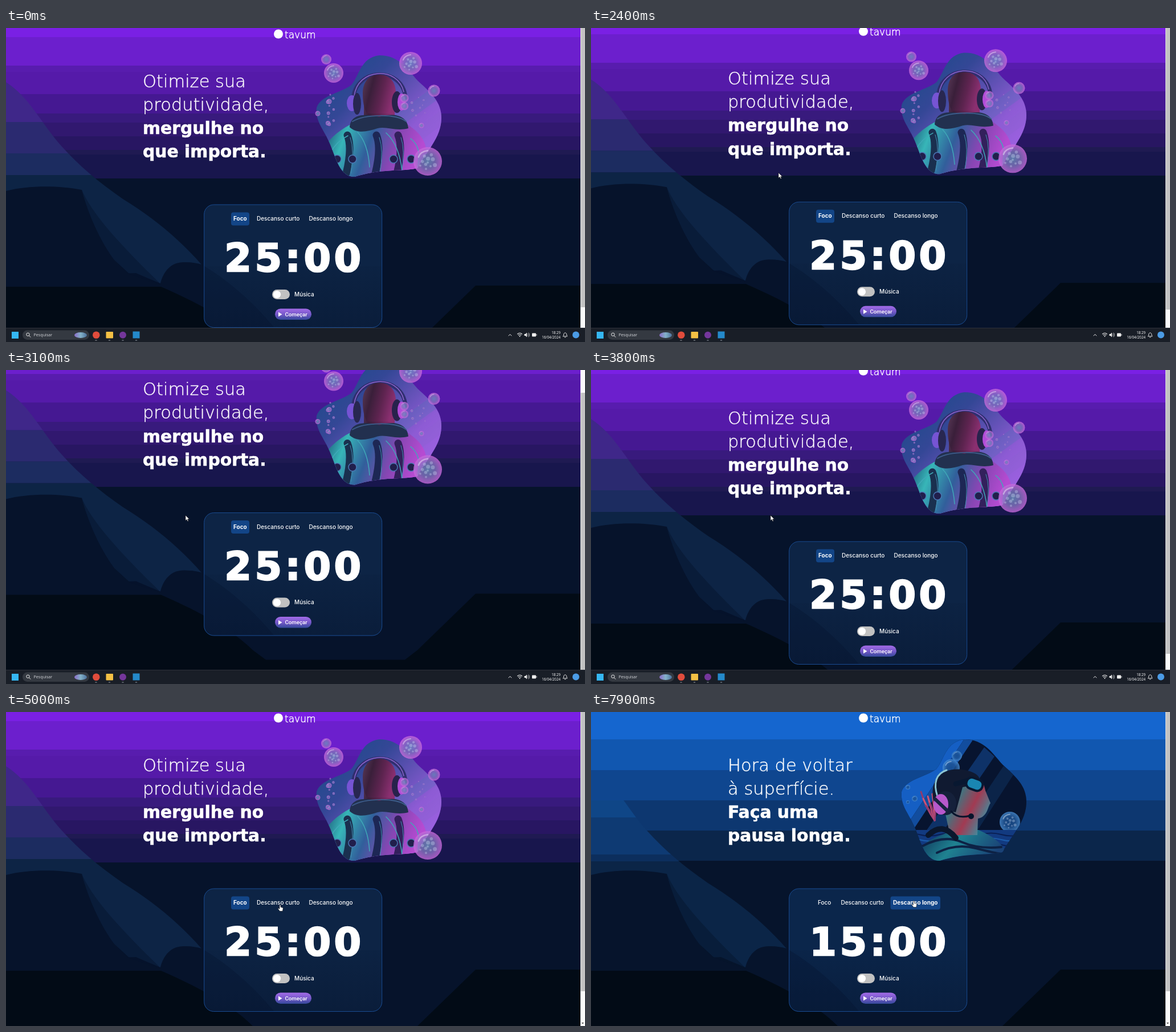
An HTML page for the animation above (8 s loop, 1016 px wide and 551 px high).

```html
<!DOCTYPE html>
<html lang="pt">
<head>
<meta charset="utf-8">
<title>Cronômetro</title>
<style>
html, body { margin: 0; width: 100%; height: 100%; overflow: hidden; background: #06122b; }
svg { display: block; width: 1016px; height: 551px; }
.head { font-family: "DejaVu Sans", sans-serif; fill: #fff; stroke: #fff; }
.thin { font-size: 30.5px; font-weight: 200; stroke-width: .4px; }
.bold { font-size: 29.8px; font-weight: 700; stroke-width: .6px; }
.name { font-size: 17px; font-weight: 200; stroke-width: .5px; }
.clock { font-size: 68.5px; font-weight: 700; letter-spacing: 5.5px; stroke-width: 2.4px; text-anchor: middle; }
.ui { font: 500 10px Inter, sans-serif; fill: #fff; }
.ui .on { font-weight: 700; }
.start { font: 500 9.7px Roboto, sans-serif; fill: #fff; }
.bar { font: 7.2px "Open Sans", sans-serif; fill: #d4d6da; }
.now { font-size: 6.2px; text-anchor: end; fill: #fff; }
</style>
</head>
<body>
<svg id="stage" viewBox="0 0 1016 551"></svg>
<script>
const LOOP = 8000, PAGE = 611;

const RIDGE = "M0 95C42 122 62 168 98 208C130 244 165 272 205 300C262 335 306 373 343 415C318 408 290 408 275 450L228 430L0 440Z";
const HILL = "M0 286C38 276 92 276 133 284C139 308 158 364 190 407L215 430L275 454H0Z";
const SLOPE = "M133 284C150 325 200 380 272 450L215 432L190 407C158 364 139 308 133 284Z";
const MOUND = "M270 452C276 424 292 410 314 411C328 411 336 414 348 417L390 452L435 552H330Z";
const DEEP = "M0 454H272C322 476 390 508 433 551L456 568H700L722 551L824 452H1008V611H0Z";
const BLOB = "M655 48C690 48 704 72 722 92C748 116 764 130 764 158C764 192 738 216 722 246C700 252 660 246 612 261C584 262 578 222 566 198C556 176 543 164 545 140C552 118 588 114 606 100C620 84 622 52 655 48Z";
const BLOB_B = "M632 54C652 44 672 58 686 78C712 94 754 92 765 132C770 180 746 246 706 262C664 270 610 256 582 226C564 196 538 162 552 130C562 108 584 92 600 82C612 92 626 82 640 80Z";

const themes = [
  {
    bands: [[0, "#7a20e4"], [16, "#6c1fcd"], [66, "#581cae"], [77, "#551aa9"], [116, "#451892"], [150, "#381a7d"], [166, "#31186f"], [190, "#281662"], [214, "#1f1a52"], [222, "#18164d"], [264, "#06132b"]],
    ridge: [[95, "#3f2789"], [165, "#2b2a70"], [220, "#1c2c60"], [258, "#0d2445"]],
    lines: ["Otimize sua", "produtividade,", "mergulhe no", "que importa."],
    clock: "25:00", tabs: [399, 440, 531.5], pill: [395, 32], card: "#0d2445"
  },
  {
    bands: [[0, "#106957"], [42, "#0c5350"], [150, "#0b2e49"], [187, "#07303f"], [222, "#052937"], [259, "#06142e"]],
    ridge: [[150, "#0c5350"], [214, "#0c304a"], [262, "#0c2b48"]],
    lines: ["Que tal dar", "uma respirada?", "Faça uma", "pausa curta!"],
    clock: "05:00", tabs: [398, 438.5, 532], pill: [434, 85], card: "#0c2c47"
  },
  {
    bands: [[0, "#1566cf"], [48, "#1157b0"], [102, "#0f468f"], [155, "#0d3770"], [208, "#0b264b"], [261, "#06142c"]],
    ridge: [[155, "#0f4687"], [185, "#0e3a73"], [250, "#0c2e5d"], [262, "#0b2547"]],
    lines: ["Hora de voltar", "à superfície.", "Faça uma", "pausa longa."],
    clock: "15:00", tabs: [398, 438.5, 530], pill: [525.5, 87.5], card: "#0b264b"
  }
];

const circle = (x, y, r, a) => `<circle cx="${x}" cy="${y}" r="${r}" ${a}/>`;
const oval = (x, y, rx, ry, a) => `<ellipse cx="${x}" cy="${y}" rx="${rx}" ry="${ry}" ${a}/>`;
const rect = (x, y, w, h, a) => `<rect x="${x}" y="${y}" width="${w}" height="${h}" ${a}/>`;
const shape = (d, a) => `<path d="${d}" ${a}/>`;
const line = (d, color, w) => shape(d, `fill="none" stroke="${color}" stroke-width="${w}" stroke-linecap="round" stroke-linejoin="round"`);
const text = (x, y, s, cls) => `<text x="${x}" y="${y}" class="${cls}">${s}</text>`;
const stops = colors => colors.map((c, i) => `<stop offset="${i / (colors.length - 1)}" stop-color="${c}"/>`).join("");
const linear = (id, x2, y2, ...colors) => `<linearGradient id="${id}" x2="${x2}" y2="${y2}">${stops(colors)}</linearGradient>`;
const radial = (id, ...colors) => `<radialGradient id="${id}">${stops(colors)}</radialGradient>`;
const bands = list => list.map(([y, c], i) => rect(0, y, 1008, (list[i + 1] || [PAGE])[0] - y, `fill="${c}"`)).join("");

function backdrop(t) {
  const ground = t.bands[t.bands.length - 1][1];
  return `<g shape-rendering="crispEdges">${bands(t.bands)}</g>`
    + `<g clip-path="url(#ridge)">${bands(t.ridge)}</g>`
    + shape(HILL, `fill="${ground}"`) + shape(SLOPE, `fill="${ground}" opacity=".45"`)
    + shape(MOUND, `fill="${ground}"`) + shape(DEEP, 'fill="#020b16"');
}

function card(t, n) {
  const names = ["Foco", "Descanso curto", "Descanso longo"];
  const labels = names.map((s, i) => text(t.tabs[i], 338, s, i === n ? "on" : "")).join("");
  return rect(347.7, 310, 312, 215.5, `rx="17" fill="${t.card}"`)
    + shape("M348 418H659V508C659 520 650 525 642 525H365C354 525 348 516 348 508Z", 'fill="url(#shade)"')
    + shape("M348 418C392 444 436 484 470 525H365C354 525 348 516 348 508Z", 'fill="#06132b" opacity=".3"')
    + rect(347.7, 310, 312, 215.5, 'rx="17" fill="none" stroke="#194b91"')
    + rect(t.pill[0], 323.5, t.pill[1], 23, 'rx="4" fill="#134587"')
    + `<g class="ui">${labels}${text(506, 470.7, "Música", "")}</g>`
    + text(506, 427.3, t.clock, "head clock")
    + rect(467, 459, 31, 17, 'rx="8.5" fill="#c1c1c1"') + circle(475.5, 467.5, 6.6, 'fill="#fff"')
    + rect(472, 492.5, 64, 19.5, 'rx="9.7" fill="url(#button)"')
    + shape("M478 498.5L484.5 502.5L478 506.5Z", 'fill="#fff"')
    + text(489.5, 505.7, "Começar", "start");
}

const scene = (t, n) => backdrop(t)
  + circle(478, 10.5, 8, 'fill="#fff"') + text(489, 17.5, "tavum", "head name")
  + t.lines.map((s, i) => text(240, 103.5 + i * 41.3, s, "head " + (i < 2 ? "thin" : "bold"))).join("")
  + card(t, n);

function bubble(x, y, r, tone) {
  let s = circle(x, y, r, `fill="url(#${tone})" fill-opacity=".8"`);
  if (r > 15) {
    for (let i = 0; i < 11; i++) {
      const a = i * 2.4, d = r * 0.19 * Math.sqrt(i);
      s += circle(x + d * Math.cos(a), y + d * Math.sin(a) + 2, r * (0.08 + i % 3 * 0.03), 'fill="#dfeaff" fill-opacity=".3"');
    }
  }
  return s + line(`M${x - r * .65} ${y - r * .3}Q${x - r * .5} ${y - r * .7} ${x} ${y - r * .75}`, "#ffffff66", r * .1);
}

function bubbles(tone) {
  const big = [[562, 55, 9], [575, 79, 17], [710, 62, 20], [751, 110, 10.5], [740, 234, 25], [699, 123, 7.5], [699, 137, 7], [547, 150, 4.5], [729, 171, 4.5], [567, 129, 4.5], [565, 167, 4]];
  let s = big.map(b => bubble(...b, tone)).join("");
  for (let i = 0; i < 9; i++) s += bubble(569 + 6 * Math.sin(i * 2), 117 + i * 6.5, 1.5 + i % 3 * .7, tone);
  for (let i = 0; i < 8; i++) s += bubble(724 + 12 * Math.sin(i * 2.3), 122 + i * 4.5, 1 + i % 3 * .6, tone);
  return s;
}

const stripes = (list, w) => list.map(([x, c]) => shape(`M${x} 265L${x + 215} 110`, `fill="none" stroke="${c}" stroke-width="${w}"`)).join("");

const diver = `<g clip-path="url(#blob)">${rect(540, 40, 230, 230, 'fill="url(#sky0)"')}`
  + stripes([[545, "#4d74b444"], [615, "#8b61cf55"], [685, "#bd79f466"]], 22)
  + line("M609 128C610 68 696 66 701 122", "#302f70", 7) + line("M611 120C616 70 688 66 698 112", "#8d64cd", 1.5)
  + shape("M556 212C570 190 590 176 611 166H700C717 178 736 190 738 218L722 262H556Z", 'fill="url(#jacket)"')
  + shape("M628 112H682V166H628Z", 'fill="url(#hair)"')
  + shape("M655 82C676 82 684 98 684 114C684 130 681 141 676 150H633C628 140 626 130 626 114C626 98 634 82 655 82Z", 'fill="url(#hair)"')
  + shape("M603 174C605 150 630 150 655 156C682 148 704 154 706 176C684 182 668 172 652 176C634 182 616 186 603 174Z", 'fill="#22304f"')
  + line("M608 164C630 151 684 150 702 164", "#3d5c8a", 2)
  + [[599, "#1a304f"], [650, "#1d2755"], [688, "#33205c"]].map(([x, c]) =>
    line(`M${x} 188Q${x + 9} 210 ${x - 2} 255`, c, 13) + line(`M${x + 5} 192Q${x + 13} 213 ${x + 6} 255`, "#458fb5", 1)).join("")
  + line("M570 218Q580 199 600 189M617 183Q635 202 638 244M667 184Q690 205 695 251M710 194Q731 210 722 246", "#3fa9b8", 1.5)
  + [581, 608, 680, 711].map(x => circle(x, 230, 7, 'fill="#211f4c" stroke="#4a76b4" stroke-width="1.5"')).join("")
  + "</g>" + oval(607, 132, 9, 14, 'fill="#7654d4"') + oval(616, 133, 7, 19, 'fill="#282751"')
  + oval(686, 130, 9, 19, 'fill="#28224c"') + oval(694, 130, 7, 15, 'fill="#b24dd8"') + bubbles("pink");

const runner = `<g clip-path="url(#blobB)">${rect(540, 40, 230, 230, 'fill="#081330"')}`
  + shape("M630 45L772 153V40H650Z", 'fill="#0d5a51"') + shape("M654 75L755 190L770 165V80Z", 'fill="#0c4f4c"')
  + shape("M555 118L600 80L680 155L720 202L690 215Z", 'fill="#101a42"')
  + "</g>"
  + line("M619 135Q608 160 615 186", "#06131d", 11)
  + shape("M612 118C612 92 630 78 650 78C672 78 684 86 688 100L660 152H628C616 144 612 132 612 118Z", 'fill="#071419"')
  + shape("M650 96C664 86 682 92 686 106L691 128C692 146 686 154 668 156L672 177H636L642 140Z", 'fill="url(#skin)"')
  + line("M627 126C614 91 631 78 656 80", "#0a282a", 6) + line("M621 122C614 92 629 78 653 78", "#38aa63", 1.3)
  + oval(631, 135, 14, 17, 'fill="#081b1e"') + oval(626, 135, 9, 13, 'fill="none" stroke="#2b4a47" stroke-width="1.5"')
  + shape("M580 232C594 206 618 200 637 164L674 168L677 193C701 199 714 222 706 261C670 270 610 258 580 232Z", 'fill="#0b1329"')
  + shape("M617 204C641 191 660 207 677 194C704 202 711 229 706 260L678 264C690 246 680 226 657 226C638 224 628 212 617 204Z", 'fill="url(#vest)"')
  + line("M639 176Q653 186 674 178M638 184Q652 193 675 187", "#252b57", 3)
  + line("M618 207Q641 221 647 260M596 220Q614 230 620 250M626 199Q657 222 679 264", "#22386f", 1.3)
  + bubbles("mint");

const swimmer = `<g clip-path="url(#blob)">${rect(540, 40, 230, 230, 'fill="#07142f"')}`
  + shape("M540 40H660L540 220Z", 'fill="#155fc4"') + shape("M660 40H676L540 245V220Z", 'fill="#124d9e"')
  + shape("M690 62L708 78L590 250L556 255Z", 'fill="#0e3268"') + shape("M727 90L745 104L680 205H650Z", 'fill="#0b2449"')
  + bubble(632, 98, 15, "azure") + bubble(642, 77, 9, "azure") + bubble(735, 193, 18, "azure")
  + bubble(556, 132, 4, "azure") + bubble(568, 152, 5, "azure") + bubble(556, 158, 3, "azure")
  + rect(540, 207, 230, 60, 'fill="#123a80"')
  + [0, 1, 2, 3, 4].map(i => line(`M540 ${215 + i * 9}q18 -5 36 0t36 0t36 0t36 0t36 0t36 0`, i % 2 ? "#1c5cab" : "#0a1f52", 2)).join("")
  + [0, 1, 2, 3, 4, 5, 6].map(i => line(`M603 190Q${588 + i * 3} 170 ${579 + i * 4} ${140 + i * 3 % 7 * 4}`, i % 2 ? "#ce5374" : "#8e3b70", 3)).join("")
  + shape("M574 252C586 216 616 222 634 205L680 207C710 220 725 234 731 252L610 263Z", 'fill="url(#suit)"')
  + line("M582 235Q620 215 650 228T720 237M607 247Q640 230 675 239T720 249", "#0d2245", 4)
  + "</g>"
  + shape("M641 107C673 103 689 118 692 138L701 160C696 166 696 184 679 187L678 216H630L620 170Z", 'fill="url(#face)"')
  + shape("M604 169C588 117 617 97 651 101C680 105 687 118 679 126L652 132L640 176Z", 'fill="#101a31"')
  + line("M640 126L662 120", "#081831", 9) + `<g transform="rotate(20 674 128)">${rect(658, 117, 29, 20, 'rx="9" fill="#1a86b2" stroke="#081831" stroke-width="4"')}</g>`
  + line("M608 148C600 124 606 108 624 102", "#8cc5d3", 3) + oval(622, 160, 19, 21, 'fill="#15213b"')
  + oval(614, 162, 13, 18, 'fill="#b759cb"') + line("M604 153L625 173", "#18233f", 6)
  + line("M632 174Q643 188 665 182", "#07142c", 3) + circle(667, 183, 5, 'fill="#07142c"')
  + line("M592 216Q617 192 640 221", "#0a172d", 10);

const taskbar = rect(0, 526, 1016, 25, 'fill="#191e27"') + rect(0, 526, 1016, .7, 'fill="#343942"')
  + rect(10, 533, 12, 12, 'fill="#35b6f2"')
  + rect(29, 530.5, 117, 16.5, 'rx="8.2" fill="#343941"')
  + circle(38.5, 537.8, 2.7, 'fill="none" stroke="#eee"') + line("M40.6 540L43 542.4", "#eee", 1)
  + text(48.5, 541.4, "Pesquisar", "bar")
  + oval(131, 539, 11, 5, 'fill="url(#widget)"')
  + circle(158.3, 538.7, 6.3, 'fill="#e04c3c"') + rect(175.5, 533, 12.5, 11.5, 'rx="1" fill="#f4c044"')
  + circle(205, 538.7, 6, 'fill="#74369b"') + rect(222.5, 532.5, 12, 12, 'fill="#2489ca"')
  + [158, 181.5, 205, 228.5].map(x => rect(x - 1.7, 547.4, 3.4, 1.2, 'rx=".6" fill="#9aa1aa"')).join("")
  + line("M882 540L884.5 537.5L887 540", "#eee", 1)
  + line("M897.5 537Q901.5 533.5 905.5 537M899.2 539Q901.5 537 903.8 539", "#eee", 1.1) + circle(901.5, 541, 1, 'fill="#eee"')
  + shape("M909.5 537h2l2.5-2.5v8l-2.5-2.5h-2Z", 'fill="#eee"') + line("M915.5 536.5q2 2 0 4M917 535q3.3 3.5 0 7", "#eee", .8)
  + rect(923, 535.5, 7, 6, 'rx="1" fill="#eee"') + rect(930.5, 537.3, 1, 2.4, 'fill="#eee"')
  + text(973, 536.7, "18:29", "bar now") + text(973, 545.3, "16/04/2024", "bar now")
  + line("M977.5 541H985L983.8 539V537Q981.2 532.5 978.6 537V539ZM980.3 542.7H982", "#eee", .9)
  + circle(1000, 538.5, 6, 'fill="#4b9be5"');

const defs = linear("sky0", 1, 1, "#0f4d83", "#344796", "#8d5bd4", "#ad67ef")
  + linear("jacket", 1, .2, "#173e69", "#37b6b8", "#315f9b", "#8846b4", "#b64bd2") + linear("hair", 1, .3, "#5a3a58", "#3a1f3a", "#5e2450", "#8a2f70")
  + linear("skin", 1, .4, "#241417", "#7c4247", "#34753f") + linear("vest", 1, 1, "#739a32", "#4fc33b", "#138542")
  + linear("suit", 1, .3, "#0d2750", "#1f8291", "#1a4276") + linear("face", 1, .7, "#5c2238", "#2f7f88", "#a23a52", "#3596a8")
  + linear("button", 0, 1, "#a36be8", "#7659c9", "#35499b") + linear("widget", 1, 0, "#8b6bc8", "#83b2c8", "#4d719d")
  + `<linearGradient id="shade" x2="0" y2="1"><stop offset="0" stop-color="#06132b" stop-opacity=".08"/><stop offset="1" stop-color="#06132b" stop-opacity=".4"/></linearGradient>`
  + radial("pink", "#6c91be", "#8174bf", "#ca68dc") + radial("mint", "#1d5a60", "#2a706c", "#4d9a87") + radial("azure", "#174f92", "#1f5699", "#4a8fd4")
  + [["ridge", RIDGE], ["blob", BLOB], ["blobB", BLOB_B]].map(([id, d]) => `<clipPath id="${id}">${shape(d, "")}</clipPath>`).join("");

const group = (id, s) => `<g id="${id}">${s}</g>`;
const $ = id => document.getElementById(id);
$("stage").innerHTML = `<defs>${defs}</defs>`
  + group("page", themes.map((t, i) => group("scene" + i, scene(t, i))).join("")
    + [diver, runner, swimmer].map((s, i) => group("art" + i, s)).join(""))
  + rect(1008, 0, 8, 551, 'fill="#fbfbfb"')
  + group("thumb", rect(1008.5, -13, 7.5, 503, 'fill="#c3c3c3"'))
  + shape("M1010 545H1014L1012 547.5Z", 'fill="#444"')
  + group("taskbar", taskbar)
  + group("arrow", shape("M0 0V9.3L2.2 7.3L3.7 10.6L5.2 9.9L3.8 6.7H6.7Z", 'fill="#fff" stroke="#111" stroke-width=".6"'))
  + group("hand", shape("M3 1Q4 -.3 5 1V4.4L8.3 5.2Q9.5 5.7 9.2 7L8.3 11.6H3.5L.4 7.6Q-.1 6.3 1.5 6.4L3 7.7Z", 'fill="#fff" stroke="#111" stroke-width=".6"'));

// Rows are [ms, values...]
const scrollKeys = [[200, 0], [500, 42], [700, 59.5], [800, 32], [900, 9], [1000, 2.5], [1100, 0], [2200, 0], [2400, 4.7], [2500, 4.7], [2800, 39], [3100, 59.5], [3600, 59.5], [3700, 32], [3800, 9], [4000, 1.5], [4100, 0]];
const cursorKeys = [[1100, 508, 162], [1200, 502.5, 227], [1300, 502.5, 227], [1700, 490, 300], [1900, 455, 313], [2200, 361, 290], [2400, 329, 254], [2500, 329, 254], [3100, 315, 255], [3800, 315, 255], [4100, 323, 255], [4200, 323, 255], [4700, 477, 338], [5500, 477, 338], [5700, 485, 334], [5800, 485, 334], [6400, 574.5, 331], [7800, 574.5, 331], [7900, 562.5, 331]];

function sample(keys, t) {
  const i = keys.findIndex(k => k[0] > t);
  if (i < 0) return keys[keys.length - 1].slice(1);
  if (!i) return keys[0].slice(1);
  const a = keys[i - 1], b = keys[i], p = (t - a[0]) / (b[0] - a[0]);
  return a.slice(1).map((v, n) => v + (b[n + 1] - v) * p);
}

const show = (id, on) => $(id).setAttribute("display", on ? "inline" : "none");
const move = (id, x, y) => $(id).setAttribute("transform", `translate(${x} ${y})`);
const phase = (t, a, b) => t < a ? 0 : t < b ? 1 : 2;

function draw(now) {
  const t = Math.floor(now % LOOP / 100) * 100;
  const [y] = sample(scrollKeys, t), [cx, cy] = sample(cursorKeys, t);
  const theme = phase(t, 5100, 7400), art = phase(t, 5300, 7600);
  for (let i = 0; i < 3; i++) {
    show("scene" + i, i === theme);
    show("art" + i, i === art);
  }
  move("page", 0, -y);
  move("thumb", 0, y * 0.89);
  show("taskbar", t < 5000);
  show("arrow", t >= 300 && t < 4700);
  show("hand", t >= 4700);
  move("arrow", cx, cy);
  move("hand", cx, cy);
}

const begin = performance.now();
function tick() {
  draw(performance.now() - begin);
  requestAnimationFrame(tick);
}
tick();
</script>
</body>
</html>
```
